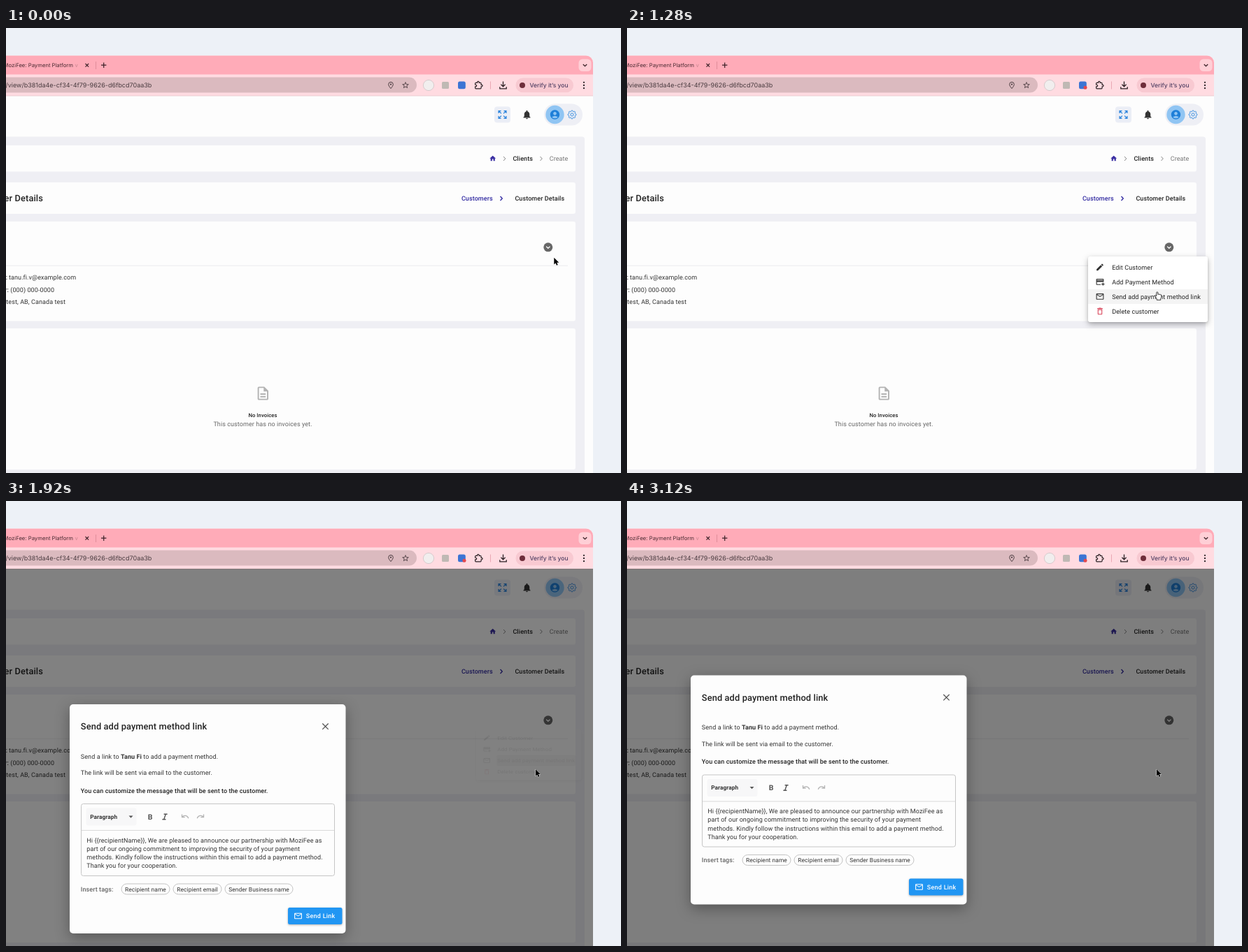
Animation of 879x637 px, one loop 3.2 s. Source, as an HTML page:

```html
<!DOCTYPE html>
<html lang="en">
<head>
<meta charset="utf-8">
<title>Send payment method link</title>
<style>
  html, body { margin: 0; width: 100%; height: 100%; overflow: hidden; background: #edf1f7; }
  svg { display: block; }
  text { font-family: Roboto, Arial, sans-serif; letter-spacing: .01em; white-space: pre; text-rendering: geometricPrecision; }
  .ui { font-family: Inter, "Open Sans", sans-serif; letter-spacing: 0; }
  .paper { filter: drop-shadow(0 3px 4px rgba(0,0,0,.28)) drop-shadow(0 1px 1px rgba(0,0,0,.12)); }
  .dialog { filter: drop-shadow(0 6px 10px rgba(0,0,0,.32)); }
</style>
</head>
<body>
<svg id="stage" width="879" height="637" viewBox="0 0 879 637"></svg>
<script>
const ICON = {
  home: 'M10 20v-6h4v6h5v-8h3L12 3 2 12h3v8z',
  bell: 'M12 22c1.1 0 2-.9 2-2h-4c0 1.1.89 2 2 2zm6-6v-5c0-3.07-1.64-5.64-4.5-6.32V4c0-.83-.67-1.5-1.5-1.5s-1.5.67-1.5 1.5v.68C7.63 5.36 6 7.92 6 11v5l-2 2v1h16v-1l-2-2z',
  edit: 'M3 17.25V21h3.75L17.81 9.94l-3.75-3.75L3 17.25zM20.71 7.04c.39-.39.39-1.02 0-1.41l-2.34-2.34c-.39-.39-1.02-.39-1.41 0l-1.83 1.83 3.75 3.75 1.83-1.83z',
  mail: 'M22 6c0-1.1-.9-2-2-2H4c-1.1 0-2 .9-2 2v12c0 1.1.9 2 2 2h16c1.1 0 2-.9 2-2V6zm-2 0l-8 5-8-5h16zm0 12H4V8l8 5 8-5v10z',
  trash: 'M6 19c0 1.1.9 2 2 2h8c1.1 0 2-.9 2-2V7H6v12zM8 9h8v10H8V9zm7.5-5l-1-1h-5l-1 1H5v2h14V4z',
  card: 'M20 4H4c-1.11 0-1.99.89-1.99 2L2 18c0 1.11.89 2 2 2h10v-2H4v-6h18V6c0-1.11-.89-2-2-2zm0 4H4V6h16v2zm4 9v2h-3v3h-2v-3h-3v-2h3v-3h2v3h3z',
  doc: 'M8 16h8v2H8zm0-4h8v2H8zm6-10H6c-1.1 0-2 .9-2 2v16c0 1.1.89 2 1.99 2H18c1.1 0 2-.9 2-2V8l-6-6zm4 18H6V4h7v5h5v11z',
  user: 'M12 2C6.48 2 2 6.48 2 12s4.48 10 10 10 10-4.48 10-10S17.52 2 12 2zm0 4c1.93 0 3.5 1.57 3.5 3.5S13.93 13 12 13s-3.5-1.57-3.5-3.5S10.07 6 12 6zm0 14c-2.03 0-4.43-.82-6.14-2.88C7.55 15.8 9.68 15 12 15s4.45.8 6.14 2.12C16.43 19.18 14.03 20 12 20z',
  star: 'M22 9.24l-7.19-.62L12 2 9.19 8.63 2 9.24l5.46 4.73L5.82 21 12 17.27 18.18 21l-1.63-7.03L22 9.24zM12 15.4l-3.76 2.27 1-4.28-3.32-2.88 4.38-.38L12 6.1l1.71 4.04 4.38.38-3.32 2.88 1 4.28L12 15.4z'
};

const text = (x, y, s, o = {}) =>
  `<text x="${x}" y="${y}" font-size="${o.size || 9}" font-weight="${o.weight || 400}" fill="${o.fill || '#333'}" text-anchor="${o.anchor || 'start'}" ${o.more || ''}>${s}</text>`;
const rect = (x, y, w, h, fill, r = 0, more = '') =>
  `<rect x="${x}" y="${y}" width="${w}" height="${h}" rx="${r}" fill="${fill}" ${more}/>`;
const dot = (x, y, r, fill, more = '') => `<circle cx="${x}" cy="${y}" r="${r}" fill="${fill}" ${more}/>`;
const line = (d, color, w = 1, more = '') =>
  `<path d="${d}" fill="none" stroke="${color}" stroke-width="${w}" ${more}/>`;
const icon = (x, y, size, name, fill) =>
  `<path transform="translate(${x - size / 2} ${y - size / 2}) scale(${size / 24})" d="${ICON[name]}" fill="${fill}"/>`;
const ui = 'class="ui"';

function gear(x, y) {
  let d = '';
  for (let i = 0; i < 64; i++) {
    const a = i / 64 * Math.PI * 2;
    const r = 5.3 + .75 * Math.tanh(3 * Math.cos(a * 8));
    d += `${i ? 'L' : 'M'}${(x + r * Math.cos(a)).toFixed(2)} ${(y + r * Math.sin(a)).toFixed(2)}`;
  }
  return line(d + 'Z', '#3b8fe0', 1) + dot(x, y, 2.1, 'none', 'stroke="#3b8fe0"');
}

function expand(x, y) {
  return [[-1, -1], [1, -1], [-1, 1], [1, 1]].map(([a, b]) =>
    line(`M${x + 1.6 * a} ${y + 1.6 * b}L${x + 5.2 * a} ${y + 5.2 * b}M${x + 2 * a} ${y + 5.4 * b}H${x + 5.4 * a}V${y + 2 * b}`, '#2f86dd', 1.3)
  ).join('');
}

function chrome() {
  return `<path d="M0 39.5H829a10 10 0 0 1 10 10V637H0Z" fill="#fdfdfd"/>
  <path d="M0 39.5H829a10 10 0 0 1 10 10V67H0Z" fill="#ffabb8"/>`
  + rect(0, 66.5, 839, 30.5, '#ffdbe1') + rect(0, 96.5, 839, 1, '#eccdd2')
  + text(96, 56.2, 'MoziFee: Payment Platform', { size: 7.7, anchor: 'end', fill: '#4a2c33', more: ui })
  + text(98.4, 56.2, 'v', { size: 7.7, fill: '#4a2c33', more: ui + ' opacity=".3"' })
  + line('M113.5 51l4.6 4.6M118.1 51l-4.6 4.6', '#3a2026', 1.1)
  + line('M128.5 48V59', '#e08d9b') + line('M136 53.2h7.4M139.7 49.5v7.4', '#3a2026', 1.2)
  + rect(818.5, 44.5, 18, 17.5, '#ffcfd6', 5.5) + line('M824.8 52l2.7 2.7 2.7-2.7', '#3a2026', 1.3)
  + rect(-20, 70.5, 607, 22, '#dbbabf', 11)
  + text(208.3, 85.1, '/view/b381da4e-cf34-4f79-9626-d6fbcd70aa3b', { size: 9, anchor: 'end', fill: '#4b3c40', more: ui })
  + line('M550 86.6c-2.2-2.6-3.3-4.400-3.300-5.900a3.300 3.300 0 0 1 6.600 0c0 1.500-1.100 3.300-3.300 5.900z', '#4b3c40', 1) + dot(550, 80.7, 1.1, '#4b3c40')
  + icon(571, 81.8, 12, 'star', '#4b3c40')
  + dot(604, 82, 7.6, '#f1eeee', 'stroke="#cfc4c6" stroke-width=".8"')
  + rect(623, 77, 10, 10, '#bfb9b4', 1.5)
  + rect(646, 76.500, 10.800, 10.800, '#3c74d4', 2.5)
  + `<g id="badge">${dot(655, 85.300, 2.500, '#e5484d')}</g>`
  + `<path transform="translate(669.600 75.800) scale(.5)" d="M20.500 11H19V7c0-1.100-.9-2-2-2h-4V3.500a2.500 2.500 0 0 0-5 0V5H4c-1.100 0-2 .9-2 2v3.800h1.500a2.700 2.700 0 0 1 0 5.400H2V20c0 1.100.9 2 2 2h13c1.100 0 2-.9 2-2v-4h1.500a2.500 2.500 0 0 0 0-5z" fill="none" stroke="#2b2024" stroke-width="2.300"/>`
  + line('M692.500 76.500v11', '#e9a8b3')
  + line('M710.500 76.500v7.200M707.400 80.800l3.100 3.100 3.100-3.100M705.800 84.300v2.500h9.400v-2.500', '#2b2024', 1.3)
  + rect(728.500, 71.500, 82.500, 20.800, '#f8c9d1', 10.400)
  + dot(738, 82, 4, '#6e2d3a')
  + text(776, 85.1, 'Verify it’s you', { size: 8.500, weight: 500, anchor: 'middle', fill: '#4f3f63', more: ui })
  + [77.800, 82, 86.200].map(y => dot(826, y, 1.150, '#2b2024')).join('');
}

function page() {
  const cards = [[168, 37.500], [221, 45], [277, 142.500], [430, 202]];
  return rect(-10, 155.500, 837, 500, '#efeff4', 4)
  + cards.map(([y, h]) => rect(-10, y, 824, h, '#fdfdfd', 3)).join('')
  + rect(698, 112.500, 23, 23, '#ebeef6', 4) + expand(709.500, 124)
  + icon(744.500, 124, 15, 'bell', '#333')
  + rect(769, 108.500, 55, 31, '#eeeff5', 15.500)
  + dot(784.500, 124, 13.200, '#90c5f3') + icon(784.500, 124, 16, 'user', '#1e7fd8') + gear(809, 124)
  + icon(695.700, 186.700, 10.500, 'home', '#3b2fa3')
  + line('M711 184l2.800 3-2.800 3M763.500 184l2.800 3-2.800 3', '#888', 1)
  + text(724.400, 190.200, 'Clients', { weight: 500, fill: '#222' })
  + text(776.700, 190.200, 'Create', { fill: '#777' })
  + text(53, 248.200, 'Customer Details', { size: 12.800, weight: 500, anchor: 'end', fill: '#222' })
  + text(650.900, 247.200, 'Customers', { weight: 500, fill: '#3029a0' })
  + line('M706.500 241l2.800 3-2.800 3', '#3029a0', 1.300)
  + text(727.400, 247.200, 'Customer Details', { weight: 500, fill: '#222' })
  + rect(0, 339.700, 803, 1, '#ececee')
  + text(2.200, 360.400, 'Email:', { weight: 500, anchor: 'end' }) + text(4, 360.400, 'tanu.fi.v@example.com')
  + text(4, 377.800, 'Number:', { weight: 500, anchor: 'end' }) + text(6.300, 377.800, '(000) 000-0000')
  + text(.300, 395.400, 'test, AB, Canada test')
  + `<g id="halo">${dot(775, 314, 12, 'rgba(0,0,0,.04)')}</g>`
  + dot(774.800, 313.800, 6.500, '#676767') + line('M772.200 312.800l2.600 2.500 2.600-2.500', '#fff', 1.300)
  + icon(367.300, 523, 23, 'doc', '#b3b3b3')
  + text(367, 557, 'No Invoices', { size: 7.680, weight: 500, anchor: 'middle', fill: '#222' })
  + text(367, 570.400, 'This customer has no invoices yet.', { anchor: 'middle', fill: '#666' });
}

function menu() {
  const rows = [['edit', 'Edit Customer'], ['card', 'Add Payment Method'], ['mail', 'Send add payment method link'], ['trash', 'Delete customer']];
  return `<g id="menu">` + rect(659, 327, 171, 94, '#fff', 3, 'class="paper"')
  + rect(659, 374, 171, 21, 'rgba(0,0,0,.045)', 0, 'id="hover"')
  + rect(692, 374.500, 129, 20, '#c9c1c5', 2, 'id="press"')
  + rows.map(([i, s], n) => {
      const y = 342.400 + n * 21;
      return icon(676, y, 13, i, i === 'trash' ? '#d9455a' : '#333') + text(693.200, y + 3.200, s, { fill: '#222', size: 9.050 });
    }).join('') + `</g>`;
}

function dialog() {
  const lines = [
    'Hi {{recipientName}}, We are pleased to announce our partnership with MoziFee as',
    'part of our ongoing commitment to improving the security of your payment',
    'methods. Kindly follow the instructions within this email to add a payment method.',
    'Thank you for your cooperation.'];
  const chips = [[165, 69, 'Recipient name'], [239, 69, 'Recipient email'], [313, 97, 'Sender Business name']];
  return `<g id="dialog">` + rect(91, 249.500, 394.500, 328, '#fdfdfd', 5, 'class="dialog"')
  + text(106.800, 285.600, 'Send add payment method link', { size: 12.800, weight: 500, fill: '#222' })
  + line('M452.300 277l8.400 8.400M460.700 277l-8.400 8.400', '#555', 1.300)
  + text(106.800, 327.300, 'Send a link to <tspan font-weight="700">Tanu Fi</tspan> to add a payment method.')
  + text(106.800, 350.700, 'The link will be sent via email to the customer.')
  + text(106.800, 376.200, 'You can customize the message that will be sent to the customer.', { size: 8.950, weight: 500, fill: '#222' })
  + rect(107.500, 392, 362, 103, '#fdfdfd', 3, 'stroke="#c6c6c6"') + rect(108, 429.500, 361, 1, '#dadada')
  + rect(114.500, 398, 72, 25, '#f7f7f8', 3)
  + text(120.300, 413.400, 'Paragraph', { size: 8.200, weight: 700, fill: '#333' })
  + '<path d="M175.500 409h6l-3 3.200z" fill="#555"/>'
  + text(206.200, 414.200, 'B', { size: 10.500, weight: 700, anchor: 'middle', fill: '#555' })
  + line('M225.600 406.700h5M223.400 414.200h5M228.300 406.700l-2.600 7.500', '#555', 1.400)
  + line('M251.500 407v4.200h4.200M251.800 411c2.500-3.200 7.200-2.800 9 1.800', '#b4b4b4', 1.300)
  + line('M282.500 407v4.200h-4.200M282.200 411c-2.500-3.200-7.200-2.800-9 1.800', '#b4b4b4', 1.300)
  + lines.map((s, n) => text(115.300, 447 + n * 12.330, s)).join('')
  + text(106.800, 517, 'Insert tags:', { weight: 500, fill: '#666' })
  + chips.map(([x, w, s]) => rect(x, 506.500, w, 15, '#fdfdfd', 7.500, 'stroke="#bdbdbd" stroke-width=".9"')
      + text(x + w / 2, 517, s, { size: 8.400, anchor: 'middle' })).join('')
  + rect(403, 540.500, 77.500, 24, '#2196f3', 2.500, 'style="filter:drop-shadow(0 1px 1.500px rgba(0,0,0,.3))"')
  + icon(417.500, 552.500, 13, 'mail', '#fff')
  + text(428.800, 555.700, 'Send Link', { weight: 500, fill: '#fff', more: 'style="letter-spacing:.028em"' })
  + `</g>`;
}

function cursors() {
  return `<path id="arrow" d="M0 0V9.800L2.200 7.700 3.700 11 5.400 10.200 4 7H7Z" fill="#000" stroke="#fff" stroke-width=".9" paint-order="stroke"/>
  <path id="hand" d="M-1 1V6L-2.300 4.800C-3 4.400-3.600 5-3.200 5.700L-.6 10V11.500H5V9.700L6 7.500V4.600C6 3.800 4.800 3.600 4.600 4.300 4.500 3.300 3 3.100 2.900 4 2.800 3 1.200 3 1.100 3.600V1C1-.3-1-.3-1 1Z" fill="#fff" stroke="#222" stroke-width=".9"/>`;
}

document.getElementById('stage').innerHTML = rect(0, 0, 879, 637, '#edf1f7') + chrome() + page() + menu()
  + rect(0, 97, 839, 540, '#000', 0, 'id="shade"') + dialog() + cursors();

const LOOP = 3200, STEP = 80;
// rows: time, then values
const MOUSE = [[0, 783.300, 328.800], [560, 777.200, 315], [1040, 777.200, 315], [1280, 757.800, 377.800], [1440, 757, 384]];
const MENU = [[560, .75, 0], [640, .85, .1], [720, .95, .5], [800, .985, .82], [880, .997, .96], [960, 1, 1],
  [1840, 1, 1], [1920, .877, .1], [2000, .75, 0]];
const DIALOG = [[1920, 41.500, .49], [2000, .5, .5], [2080, .5, .5], [2160, 0, .5]];

function track(rows, t) {
  let i = rows.findIndex(r => r[0] > t);
  if (i < 0) i = rows.length;
  const a = rows[Math.max(i - 1, 0)], b = rows[Math.min(i, rows.length - 1)];
  const k = b[0] > a[0] ? (t - a[0]) / (b[0] - a[0]) : 0;
  return a.slice(1).map((v, n) => v + (b[n + 1] - v) * k);
}

const el = id => document.getElementById(id);
const show = (id, on) => { el(id).style.display = on ? '' : 'none'; };
const place = (id, value) => el(id).setAttribute('transform', value);
const fade = (id, value) => el(id).setAttribute('opacity', value);

function draw(t) {
  const [x, y] = track(MOUSE, t);
  const hand = t >= 1200 && t < 1760;
  show('hand', hand);
  show('arrow', !hand);
  place(hand ? 'hand' : 'arrow', `translate(${x} ${y})`);

  const [s, alpha] = track(MENU, t);
  show('menu', alpha > 0);
  fade('menu', alpha);
  place('menu', `translate(767 328) scale(${s} ${s * s}) translate(-767 -328)`);
  show('hover', t >= 1200 && t < 1920);
  place('hover', `translate(0 ${t < 1280 ? -21 : 0})`);
  show('press', t >= 1680 && t < 2000);
  fade('press', t < 1760 ? .5 : 1);

  show('badge', t >= 400);
  show('halo', t >= 560 && t < 1120);

  const [dy, dim] = track(DIALOG, t);
  const open = t >= 1920;
  show('shade', open);
  show('dialog', open);
  fade('shade', dim);
  place('dialog', `translate(0 ${dy})`);
}

const start = performance.now();
function tick() {
  const t = (performance.now() - start) % LOOP;
  draw(Math.floor(t / STEP) * STEP);
  requestAnimationFrame(tick);
}
tick();
</script>
</body>
</html>
```
